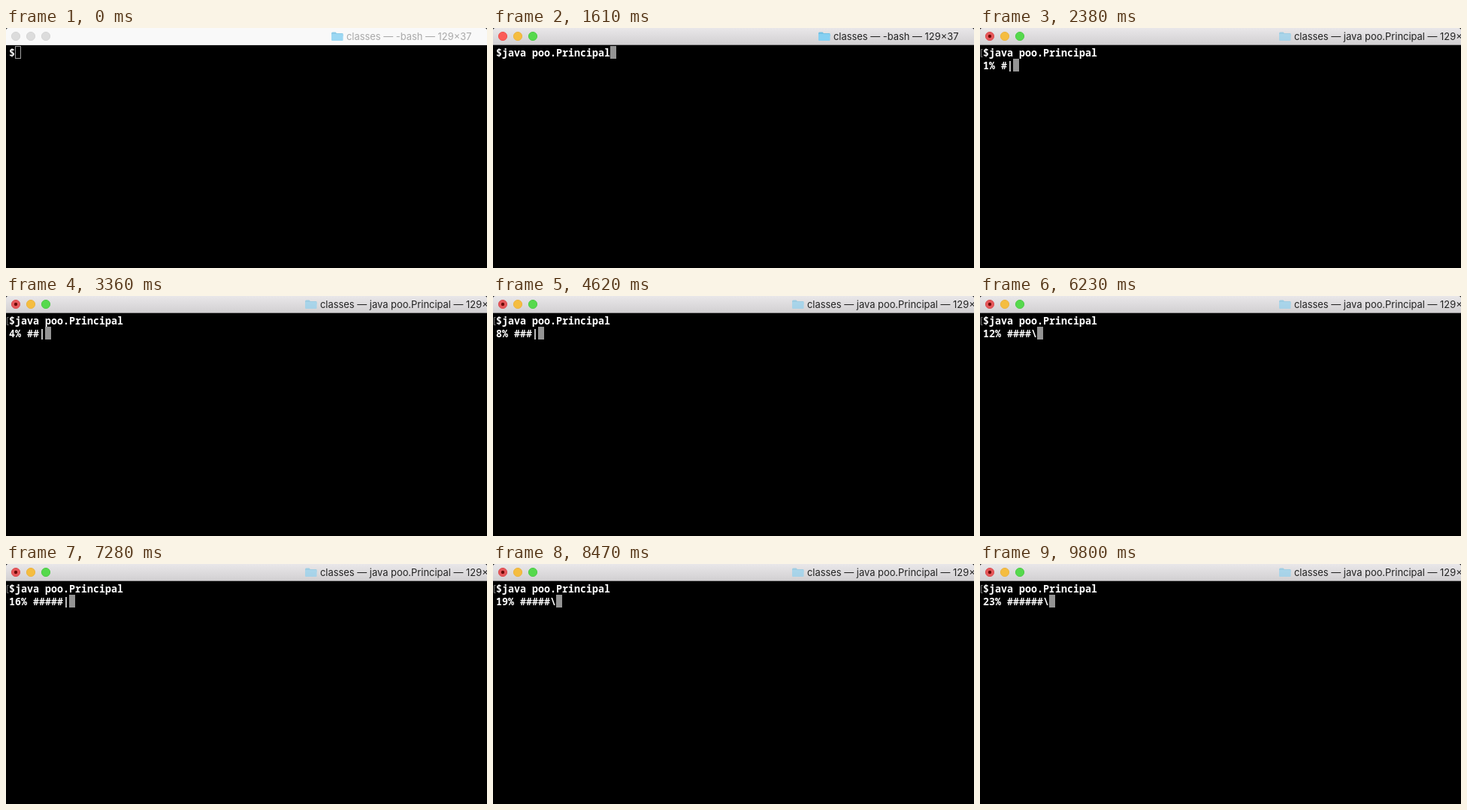
Write an HTML page that moves like this. It is 640x320 px and loops after 9.87 s.

```html
<!DOCTYPE html>
<html lang="en">
<head>
<meta charset="utf-8">
<title>Terminal progress</title>
<style>
  html, body { margin: 0; width: 100%; height: 100%; overflow: hidden; background: #000; }
  svg { display: block; width: 640px; height: 320px; }
  text { white-space: pre; }
  .term { font: 600 13.333px "Noto Sans Mono", "DejaVu Sans Mono", monospace; fill: #fff; }
  .title { font: 400 12.9px Inter, "Open Sans", sans-serif; fill: #222; }
  .idle .bar { fill: #f9f9f9; }
  .idle .edge { fill: #dedede; }
  .idle .lights circle { fill: #dcdcdc; stroke: #d6d6d6; }
  .idle .title { fill: #a9a9a9; }
  .idle .folder { opacity: .8; }
  .running .folder { opacity: .6; }
  #cursor { fill: #949494; }
  .idle #cursor { fill: none; stroke: #a0a0a0; }
  #dot, #mark { visibility: hidden; }
  .busy #dot, .running #mark { visibility: visible; }
  .busy .close { fill: #e6575a; stroke: #dc4f52; }
</style>
</head>
<body>
<svg id="stage" class="idle" viewBox="0 0 640 320">
  <defs>
    <linearGradient id="chrome" x2="0" y2="1">
      <stop stop-color="#e9e7e9"/>
      <stop offset="1" stop-color="#d2d0d2"/>
    </linearGradient>
  </defs>
  <rect width="640" height="320"/>
  <path class="bar" d="M0 22V3q0-3 3-3h634q3 0 3 3v19z" fill="url(#chrome)"/>
  <rect class="edge" y="22" width="640" height="1" fill="#8c8a8c"/>
  <g class="lights">
    <circle class="close" cx="13" cy="11" r="5.600" fill="#fc5b57" stroke="#ef524e"/>
    <circle cx="33" cy="11" r="5.600" fill="#f5bd40" stroke="#edb440"/>
    <circle cx="53" cy="11" r="5.600" fill="#56d94d" stroke="#4ecb47"/>
  </g>
  <circle id="dot" cx="13" cy="11" r="2.200" fill="#6b0a08"/>
  <g id="heading">
    <g class="folder">
      <path d="M0 7q0-1.500 1.500-1.500h4l1.500 1.500h7.500q1 0 1 1v3h-15.500z" fill="#74c2e4"/>
      <rect y="8" width="15.500" height="9" rx="1" fill="#86d0f2"/>
    </g>
    <text id="title" class="title" x="20" y="16"></text>
  </g>
  <path id="mark" d="M3.500 28.500h-2v10h2" fill="none" stroke="#777"/>
  <text id="command" class="term" x="4" y="38"></text>
  <text id="progress" class="term" x="4" y="55"></text>
  <rect id="cursor"/>
</svg>
<script>
  const LOOP = 9870, TICK = 70, CELL = 8, ROW = 17;
  const FOCUS = 70, TYPED = 1610, BUSY = 1680, ENTER = 1820, FIRST = 2030, CATCH_UP = 7770;
  // Ticks on which the spinner pauses
  const HOLDS = [2170, 2660, 3220, 3710, 4200, 4760, 5180, 5670, 6160,
                 6650, 7070, 7560, 7700, 8120, 8540, 9170, 9520];
  const SPINNER = "|/-\\";
  const el = id => document.getElementById(id);
  const stage = el("stage"), cursor = el("cursor"), heading = el("heading");

  function setText(id, value) {
    if (el(id).textContent !== value) el(id).textContent = value;
  }

  function setAttrs(node, attrs) {
    for (const name in attrs) node.setAttribute(name, attrs[name]);
  }

  function progressAt(t) {
    if (t < FIRST) return "";
    const step = Math.floor((t - FIRST) / TICK)
      - HOLDS.filter(h => h <= t).length + (t >= CATCH_UP ? 1 : 0);
    const percent = Math.floor(step / 4);
    return `${percent}% ${"#".repeat(Math.floor(percent / 4) + 1)}${SPINNER[step % 4]}`;
  }

  function placeCursor(col, row, outlined) {
    const inset = outlined ? 0.5 : 0;
    setAttrs(cursor, {
      x: 4 + col * CELL + inset,
      y: 24 + row * ROW + inset,
      width: CELL - 2 * inset,
      height: ROW - 2 * inset
    });
  }

  function draw(t) {
    const idle = t < FOCUS, running = t >= ENTER;
    const command = t >= TYPED ? "$java poo.Principal" : "$";
    const progress = progressAt(t);
    stage.setAttribute("class",
      [idle && "idle", t >= BUSY && "busy", running && "running"].filter(Boolean).join(" "));
    heading.setAttribute("transform", `translate(${running ? 398 : 433})`);
    setText("title", `classes — ${running ? "java poo.Principal" : "-bash"} — 129×37`);
    setText("command", command);
    setText("progress", progress);
    placeCursor((running ? progress : command).length, running ? 1 : 0, idle);
  }

  const start = performance.now();
  function frame() {
    draw((performance.now() - start) % LOOP);
    requestAnimationFrame(frame);
  }
  frame();
</script>
</body>
</html>
```
